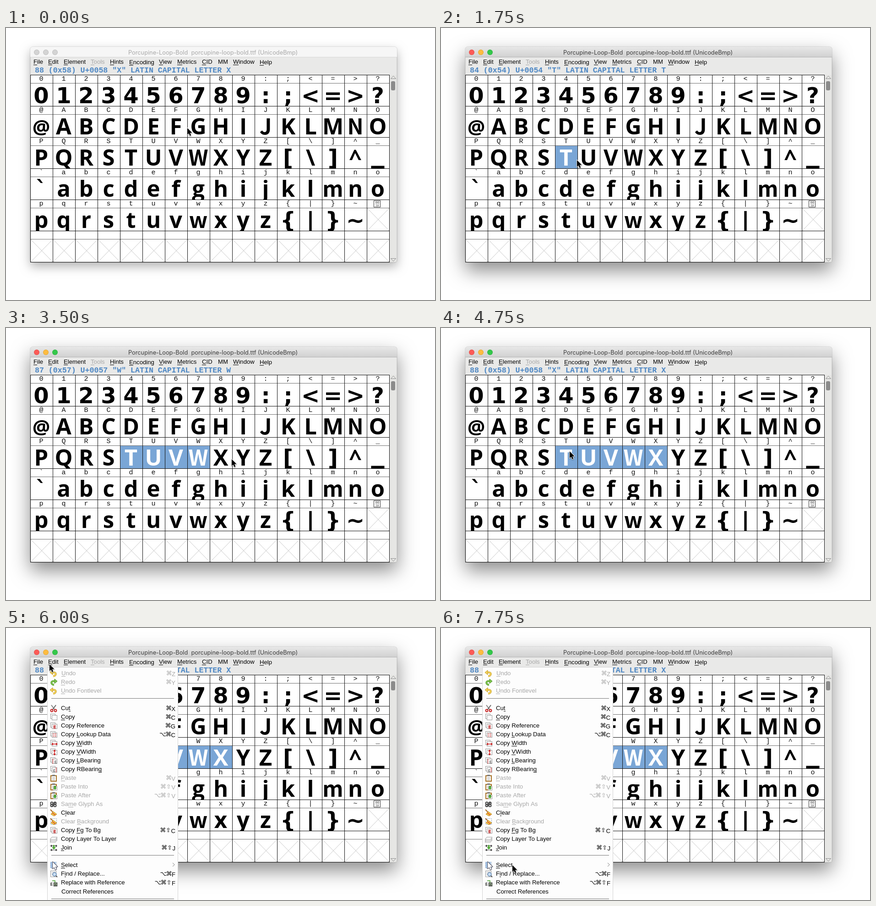
Write an HTML page with a canvas that moves like this. It is 937 px wide and 593 px high and loops after 8 s.

```html
<!DOCTYPE html>
<html lang="en">
<head>
<meta charset="utf-8">
<title>Font editor</title>
<style>
html, body { margin: 0; width: 100%; height: 100%; overflow: hidden; background: #fff; }
canvas { display: block; }
</style>
</head>
<body>
<canvas id="stage" width="937" height="593"></canvas>
<script>
const ctx = document.getElementById('stage').getContext('2d');
const LOOP = 8000, STEP = 250;
const LEFT = 53, TOP = 102, CELL = 49, ROW = 68, LABEL = 18;
const SANS = '13.15px "Liberation Sans", Arial, sans-serif';
const FIRST_SELECTED = 4, LAST_SELECTED = 8;

// time, x, y of the pointer tip
const PATH = [
  [0, 396, 218], [500, 300, 275], [750, 271, 288], [1250, 271, 288],
  [2500, 337, 287], [3250, 440, 287], [3500, 493, 286], [3750, 478, 288],
  [4000, 478, 288], [4250, 440, 301], [4750, 281, 269], [5250, 76, 86],
  [5750, 95, 79], [6250, 95, 79], [7500, 156, 502], [7750, 156, 517]
];

// "_" precedes the underlined letter
const MENU_BAR = [
  ['_File', 60], ['_Edit', 92], ['_Element', 126], ['_Tools', 185], ['_Hints', 227], ['_Encoding', 269, 1],
  ['_View', 334], ['_Metrics', 374], ['_CID', 428], ['MM', 463], ['_Window', 496], ['_Help', 554, 1]
];

// label, shortcut, icon, disabled
const EDIT_MENU = [
  ['_Undo', '⌘Z', 'undo', 1], ['_Redo', '⌘Y', 'redo', 1], ['_Undo Fontlevel', '', 'undo', 1], null,
  ['Cu_t', '⌘X', 'cut'], ['_Copy', '⌘C', 'copy'], ['Copy Reference', '⌘G', 'reference'],
  ['Copy _Lookup Data', '⌥⌘C', 'lookup'], ['Copy _Width', '', 'width'], ['Copy _VWidth', '', 'height'],
  ['Copy _LBearing', '', 'left'], ['Copy RBearin_g', '', 'right'],
  ['_Paste', '⌘V', 'paste', 1], ['Paste Into', '⌘⇧V', 'pasteInto', 1], ['Paste After', '⌥⌘⇧V', 'pasteInto', 1],
  ['Sa_me Glyph As', '', 'same', 1], ['C_lear', '', 'broom'], ['Clear _Background', '', 'broomBox', 1],
  ['Copy _Fg To Bg', '⌘⇧C', 'reference'], ['Copy Layer To Layer', '', 'layers'], ['_Join', '⌘⇧J', 'join'], null,
  ['_Select', '>', 'select'], ['F_ind / Replace...', '⌥⌘F', 'find'],
  ['Replace with Reference', '⌥⌘⇧F', 'replace'], ['Correct References', '', '']
];

function rect(x, y, w, h, color) {
  ctx.fillStyle = color;
  ctx.fillRect(x, y, w, h);
}

function line(points, color, width = 1, close = false) {
  ctx.beginPath();
  points.forEach(([x, y]) => ctx.lineTo(x, y));
  if (close) ctx.closePath();
  ctx.strokeStyle = color;
  ctx.lineWidth = width;
  ctx.stroke();
}

function polygon(points, fill) {
  ctx.beginPath();
  points.forEach(([x, y]) => ctx.lineTo(x, y));
  ctx.fillStyle = fill;
  ctx.fill();
}

function disc(x, y, r, color) {
  ctx.beginPath();
  ctx.arc(x, y, r, 0, Math.PI * 2);
  ctx.fillStyle = color;
  ctx.fill();
}

function ring(x, y, r, color, width) {
  ctx.beginPath();
  ctx.arc(x, y, r, 0, Math.PI * 2);
  ctx.strokeStyle = color;
  ctx.lineWidth = width;
  ctx.stroke();
}

function text(string, x, y, font, color, align = 'left') {
  ctx.font = font;
  ctx.fillStyle = color;
  ctx.textAlign = align;
  ctx.fillText(string, x, y);
}

function mnemonic(marked, x, y, color) {
  const at = marked.indexOf('_'), label = marked.replace('_', '');
  text(label, x, y, SANS, color);
  if (at < 0) return;
  const start = ctx.measureText(label.slice(0, at)).width;
  rect(Math.round(x + start), y + 2, Math.round(ctx.measureText(label[at]).width), 1, color);
}

function pointerAt(t) {
  const next = PATH.findIndex(key => key[0] >= t);
  if (next <= 0) return PATH[0].slice(1);
  const [t0, x0, y0] = PATH[next - 1], [t1, x1, y1] = PATH[next];
  const k = (t - t0) / (t1 - t0);
  return [x0 + (x1 - x0) * k, y0 + (y1 - y0) * k].map(Math.round);
}

// The selection trails the pointer by one step.
function lastSelected(t) {
  if (t < 1500) return -1;
  if (t >= 3750) return LAST_SELECTED;
  return Math.floor((pointerAt(t - STEP)[0] - LEFT) / CELL);
}

function drawFrame(active) {
  ctx.save();
  ctx.shadowColor = active ? 'rgba(0,0,0,.45)' : 'rgba(0,0,0,.3)';
  ctx.shadowBlur = active ? 42 : 22;
  ctx.shadowOffsetY = active ? 18 : 9;
  ctx.beginPath();
  ctx.roundRect(53, 41, 801, 470, [5, 5, 4, 4]);
  ctx.fillStyle = '#e9e9e8';
  ctx.fill();
  ctx.restore();
  ctx.strokeStyle = 'rgba(0,0,0,.18)';
  ctx.lineWidth = 1;
  ctx.stroke();

  const bar = ctx.createLinearGradient(0, 41, 0, 64);
  bar.addColorStop(0, active ? '#e8e8e8' : '#f6f6f6');
  bar.addColorStop(1, active ? '#d0d0d0' : '#f6f6f6');
  ctx.beginPath();
  ctx.roundRect(53, 41, 801, 23, [5, 5, 0, 0]);
  ctx.fillStyle = bar;
  ctx.fill();
  rect(53, 63, 801, 1, active ? '#b4b4b4' : '#d8d8d8');

  ['#fc5b57', '#fdbc40', '#34c84a'].forEach((color, i) => {
    disc(67 + 20 * i, 53, 6, active ? color : '#d4d4d4');
    ring(67 + 20 * i, 53, 5.5, 'rgba(0,0,0,.1)', 1);
  });
  text('Porcupine-Loop-Bold  porcupine-loop-bold.ttf (UnicodeBmp)', 452, 58,
    '12.8px Inter, sans-serif', active ? '#3c3c3c' : '#a9a9a9', 'center');
  MENU_BAR.forEach(([label, x, drop = 0]) =>
    mnemonic(label, x, 78 + drop, label === '_Tools' ? '#a8a8a8' : '#000'));
}

function drawScrollbar() {
  rect(838, 102, 15, 408, '#e6e6e4');
  line([[840.5, 110.5], [846, 104.5], [851.5, 110.5]], '#909090', 1, true);
  line([[840.5, 502.5], [846, 508.5], [851.5, 502.5]], '#909090', 1, true);
  ctx.beginPath();
  ctx.roundRect(841, 116, 9, 20, 3);
  ctx.fillStyle = '#8b8b8b';
  ctx.fill();
}

function glyphFont(char) {
  if (char === '@') return 'bold 43px "Open Sans", sans-serif';
  if (char === '_') return 'bold 58px "DejaVu Sans", sans-serif';
  if (/[WwJNm]/.test(char)) return 'bold 47px "Noto Sans CJK JP", sans-serif';
  if (/[A-Za-z^\\]/.test(char)) return 'bold 49px "Open Sans", sans-serif';
  return 'bold 48px "DejaVu Sans", sans-serif';
}

function drawCell(col, row, selected) {
  const x = LEFT + CELL * col, y = TOP + ROW * row, middle = x + 24;
  const code = 48 + row * 16 + col, char = String.fromCharCode(code);
  if (code >= 127) {
    const top = y + LABEL + 1, bottom = y + ROW;
    line([[x + 1, top], [x + CELL, bottom]], '#c6c6c6');
    line([[x + CELL, top], [x + 1, bottom]], '#c6c6c6');
    if (code > 127) return;
    ctx.strokeStyle = '#333';
    ctx.strokeRect(x + 15.5, y + 2.5, 14, 14);
    ['00', '7F'].forEach((pair, i) =>
      text(pair, middle - 1, y + 8.5 + 7 * i, '7px "Liberation Mono", monospace', '#333', 'center'));
    return;
  }
  text(char, middle, y + 13, '15px "Liberation Mono", monospace', '#111', 'center');
  ctx.save();
  ctx.beginPath();
  ctx.rect(x + 1, y + LABEL + 1, CELL - 1, ROW - LABEL - 1);
  ctx.clip();
  if (selected) rect(x, y + LABEL, CELL, ROW - LABEL, '#7aa6d6');
  const baseline = y + (char === '_' ? 54 : 62);
  text(char, middle, baseline, glyphFont(char), selected ? '#fff' : '#000', 'center');
  ctx.restore();
}

function drawGrid(last) {
  const infoCode = last < 0 ? 88 : 80 + last;
  const letter = String.fromCharCode(infoCode), hex = infoCode.toString(16);
  text(`${infoCode} (0x${hex}) U+00${hex} "${letter}" LATIN CAPITAL LETTER ${letter}`, 63, 97,
    'bold 16.6px "Liberation Mono", monospace', '#4d87c4');
  rect(LEFT, TOP, 785, 409, '#fff');
  for (let row = 0; row < 6; row++)
    for (let col = 0; col < 16; col++)
      drawCell(col, row, row === 2 && col >= FIRST_SELECTED && col <= last);
  for (let row = 0; row <= 6; row++) {
    rect(LEFT, TOP + ROW * row, 785, 1, '#111');
    if (row < 6) rect(LEFT, TOP + LABEL + ROW * row, 785, 1, '#707070');
  }
  for (let col = 0; col <= 16; col++) rect(LEFT + CELL * col, TOP, 1, 409, '#111');
}

function sheet(x, y, w = 10, h = 11) {
  rect(x, y, w, h, '#fff');
  ctx.strokeStyle = '#999';
  ctx.lineWidth = 1;
  ctx.strokeRect(x + .5, y + .5, w - 1, h - 1);
}

function sheets() {
  sheet(-7, -7, 11, 11);
  sheet(-4, -4, 12, 11);
}

function bentArrow(color, edge) {
  for (const [shade, width] of [[edge, 4], [color, 2.4]]) {
    ctx.beginPath();
    ctx.moveTo(-3, -2);
    ctx.bezierCurveTo(7, -4, 7, 5, -1, 6);
    ctx.strokeStyle = shade;
    ctx.lineWidth = width;
    ctx.stroke();
  }
  const head = [[-8, -2], [-2, -7], [-2, 3]];
  polygon(head, color);
  line(head, edge, 1, true);
}

function clipboard() {
  rect(-7, -6, 14, 14, '#a87328');
  rect(-5, -4, 10, 10, '#fff');
  rect(-3, -7, 6, 3, '#777');
  for (let y = -2; y < 5; y += 2) rect(-3, y, 6, 1, '#bbb');
}

function broom() {
  line([[-7, -7], [0, 0]], '#a56a2a', 2);
  const head = [[-1, -3], [7, 3], [1, 7], [-6, 3]];
  polygon(head, '#f2c444');
  line(head, '#b98520', 1, true);
  line([[-3, 0], [4, 5]], '#c33', 1.5);
}

function dashedBox() {
  ctx.setLineDash([2, 2]);
  ctx.strokeStyle = '#6f8fb5';
  ctx.lineWidth = 1;
  ctx.strokeRect(-6.5, -6.5, 13, 13);
  ctx.setLineDash([]);
}

const letterG = (x, color) => text('g', x, 5, 'bold 10px "Liberation Serif", serif', color, 'center');

const ICONS = {
  undo() { bentArrow('#f4d35a', '#c19a2b'); },
  redo() { ctx.scale(-1, 1); bentArrow('#7fc64c', '#4c8e2c'); },
  cut() {
    line([[-5, -7], [3, 4]], '#888', 2);
    line([[5, -7], [-3, 4]], '#666', 2);
    ring(-4, 5, 2.4, '#c62828', 2);
    ring(4, 5, 2.4, '#c62828', 2);
  },
  copy: sheets,
  reference() { sheets(); rect(-1, -2, 6, 7, '#e9b5b5'); letterG(2, '#b82020'); },
  lookup() { sheets(); for (let y = -2; y < 6; y += 3) { rect(-2, y, 3, 1, '#c33'); rect(2, y, 4, 1, '#c33'); } },
  width() {
    sheets();
    line([[-4, 2], [8, 2]], '#c22', 1.5);
    polygon([[-5, 2], [-1, -1], [-1, 5]], '#c22');
    polygon([[9, 2], [5, -1], [5, 5]], '#c22');
  },
  height() {
    sheets();
    line([[2, -4], [2, 7]], '#c22', 1.5);
    polygon([[2, -5], [-1, -1], [5, -1]], '#c22');
    polygon([[2, 8], [-1, 4], [5, 4]], '#c22');
  },
  left() { sheets(); rect(-2, -4, 1, 11, '#c22'); letterG(4, '#666'); },
  right() { sheets(); rect(5, -4, 1, 11, '#c22'); letterG(1, '#666'); },
  paste: clipboard,
  pasteInto() {
    clipboard();
    sheet(-1, -1, 9, 9);
    rect(1, -2, 4, 5, '#46a02c');
    polygon([[-1, 2], [7, 2], [3, 7]], '#46a02c');
  },
  same() {
    for (const x of [-4, 3]) { ring(x, -2, 2.5, '#444', 2); ring(x, 3, 2.5, '#444', 2); }
    line([[-4, 5], [4, -4]], '#444', 1.5);
  },
  broom,
  broomBox() { dashedBox(); broom(); },
  layers() {
    for (const y of [2, -1, -4]) {
      const face = [[-4, y], [8, y], [4, y + 5], [-8, y + 5]];
      polygon(face, '#fff');
      line(face, '#999', 1, true);
    }
  },
  join() {
    line([[-8, -4], [8, -4]], '#555');
    line([[-8, 5], [8, 5]], '#555');
    for (const x of [-6, 4]) { rect(x, -6, 3, 4, '#555'); rect(x, 3, 3, 4, '#555'); }
    rect(-1, -6, 3, 6, '#4aa52e');
    polygon([[-4, -1], [5, -1], [.5, 4]], '#4aa52e');
  },
  select() {
    rect(-7, -7, 12, 13, '#a9c7e8');
    dashedBox();
    ctx.translate(-2, -7);
    arrowShape('#fff', '#445');
  },
  find() {
    sheet(-7, -7, 13, 14);
    for (let y = -4; y < 5; y += 3) rect(-5, y, 8, 1, '#bbb');
    disc(2, 1, 4, '#c9def3');
    ring(2, 1, 4, '#5e83ad', 1.5);
    line([[5, 4], [8, 7]], '#555', 2);
  },
  replace() {
    letterG(-5, '#333');
    line([[-3, -4], [3, -4], [3, 0]], '#46a02c', 1.5);
    rect(0, 0, 8, 8, '#b7d8ab');
    ctx.strokeStyle = '#444';
    ctx.strokeRect(.5, .5, 7, 7);
    text('g', 4, 6, 'bold 9px "Liberation Serif", serif', '#333', 'center');
  }
};

function drawShortcut(keys, y, color) {
  if (keys === '>') {
    line([[364, y - 9], [368, y - 5], [364, y - 1]], '#777');
    return;
  }
  if (!keys) return;
  const letter = keys.slice(-1);
  text(letter, 370, y + 2, SANS, color, 'right');
  const end = 370 - ctx.measureText(letter).width;
  [...keys.slice(0, -1)].reverse().forEach((key, i) =>
    text(key, end - 6 - 12 * i, y, '13px "DejaVu Sans", sans-serif', color, 'center'));
}

function drawEditMenu() {
  rect(90, 85, 286, 508, '#d2d2d2');
  rect(91, 86, 284, 507, '#fdfdfd');
  EDIT_MENU.forEach((item, i) => {
    const center = 98 + 19 * i;
    if (!item) return rect(99, center - 2, 268, 1, '#777');
    const [label, keys, icon, disabled] = item;
    const baseline = center + 5 + (icon ? 0 : 1), color = disabled ? '#a8a8a8' : '#000';
    mnemonic(label, i && icon ? 120 : 121, baseline, color);
    drawShortcut(keys, baseline, color);
    if (!icon) return;
    ctx.save();
    ctx.translate(104, center + 1);
    ICONS[icon]();
    ctx.restore();
  });
  rect(99, 590, 268, 1, '#777');
}

function arrowShape(fill, edge) {
  const shape = [[0, 0], [0, 14.5], [3.4, 11.4], [5.8, 17], [8.2, 16], [5.8, 10.6], [10.5, 10.4]];
  ctx.lineJoin = 'round';
  line(shape, edge, 2, true);
  polygon(shape, fill);
}

function drawPointer([x, y]) {
  ctx.save();
  ctx.translate(x, y);
  ctx.shadowColor = 'rgba(0,0,0,.3)';
  ctx.shadowBlur = 2;
  ctx.shadowOffsetY = 1;
  arrowShape('#000', '#fff');
  ctx.restore();
}

function draw(now) {
  const t = Math.floor((now % LOOP) / STEP) * STEP;
  rect(0, 0, 937, 593, '#fff');
  drawFrame(t >= 750);
  drawGrid(lastSelected(t));
  drawScrollbar();
  if (t >= 6000) drawEditMenu();
  drawPointer(pointerAt(t));
}

const start = performance.now();
function tick() {
  draw(performance.now() - start);
  requestAnimationFrame(tick);
}
tick();
</script>
</body>
</html>
```
